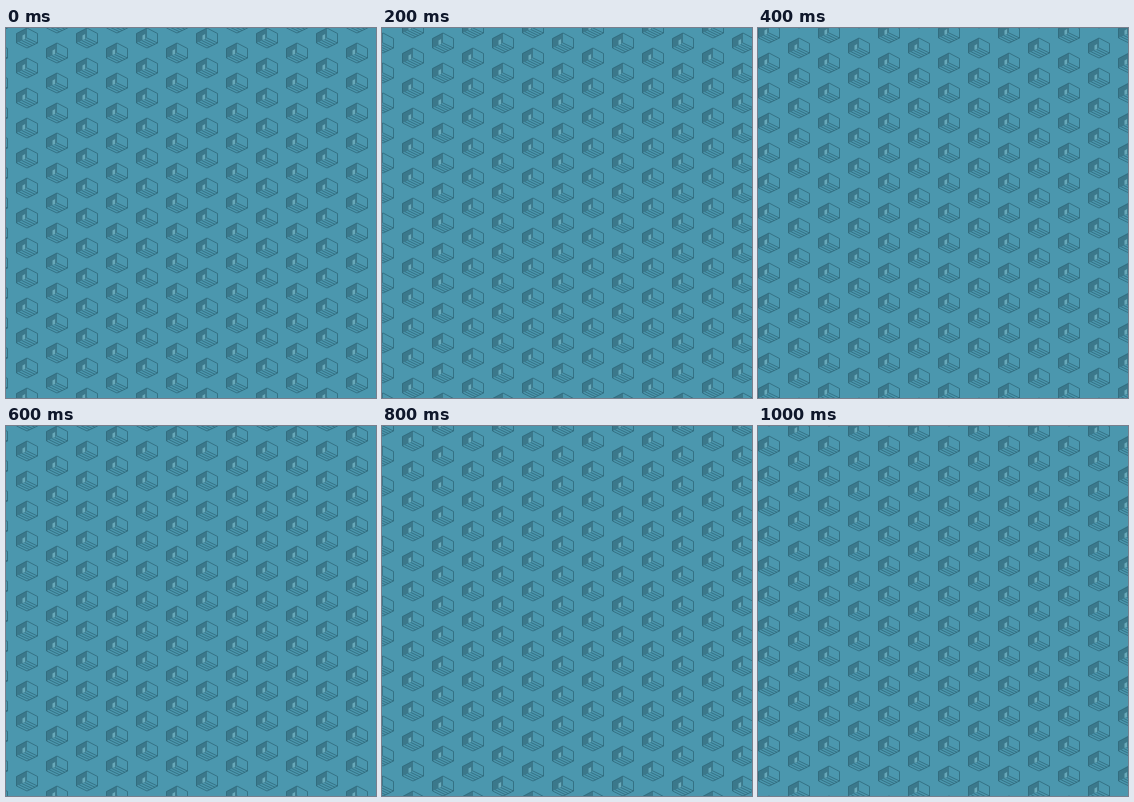
Recreate the animation shown at these times as an HTML page. Size 370 by 370 pixels, loop 1.2 s.

```html
<!DOCTYPE html>
<html lang="en">
<head>
<meta charset="utf-8">
<title>Drifting rooms</title>
<style>
  html, body { margin: 0; width: 100%; height: 100%; overflow: hidden; background: #4b97ae; }
  svg { display: block; width: 100%; height: 100%; }
</style>
</head>
<body>
<svg viewBox="0 0 370 370">
  <defs>
    <g id="room" fill="none" stroke="#2b6273" stroke-width=".7">
      <!-- left wall, outline, floorboards, door -->
      <path d="M-10.5-4.5L0-10V0L-10.5 5Z" fill="#3b788b" stroke="none"/>
      <path d="M0-10L10.5-4.5V5L0 10L-10.5 5V-4.5Z"/>
      <path d="M0 0L10.5 5M-2.6 1.25L7.9 6.25M-5.2 2.5L5.2 7.5M-7.9 3.75L2.6 8.75"/>
      <path d="M-4.5-2.6L-1.9-3.9V.9L-4.5 2.1Z" fill="#68a9ba" stroke="none"/>
    </g>
  </defs>
  <rect width="370" height="370" fill="#4b97ae"/>
  <g id="field"></g>
</svg>
<script>
  const LOOP = 1200, STEPS = 6;
  const PITCH = 30;
  const field = document.getElementById('field');

  // Every second column sits half a row lower.
  let rooms = '';
  for (let c = -3; c < 13; c++) {
    const shift = c % 2 ? PITCH / 2 : 0;
    for (let r = -2; r < 16; r++) {
      rooms += `<use href="#room" x="${21 + c * PITCH}" y="${10 + r * PITCH + shift}"/>`;
    }
  }
  field.innerHTML = rooms;

  // One loop drifts two columns right and two rows up, in held steps.
  function draw(time) {
    const step = Math.floor((time % LOOP) / LOOP * STEPS);
    const d = step * 2 * PITCH / STEPS;
    field.setAttribute('transform', `translate(${d} ${-d})`);
  }

  let start = null;
  function tick(now) {
    if (start === null) start = now;
    draw(now - start);
    requestAnimationFrame(tick);
  }
  draw(0);
  requestAnimationFrame(tick);
</script>
</body>
</html>
```
